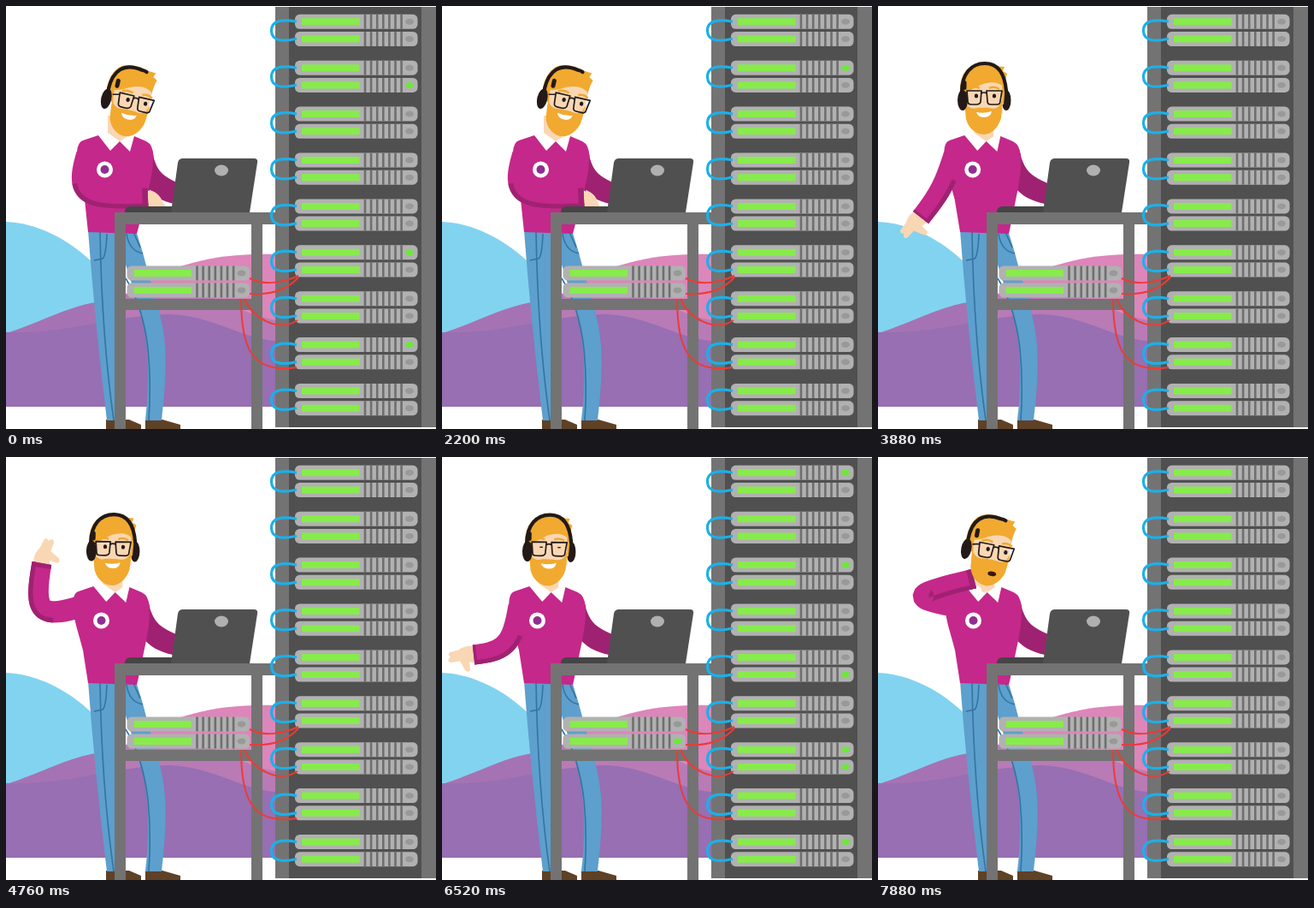
Write an HTML page that moves like this. It is 503x494 px and loops after 8 s.

```html
<!DOCTYPE html>
<html lang="en">
<head>
<meta charset="utf-8">
<title>Support desk</title>
<style>
html, body { margin: 0; width: 100%; height: 100%; overflow: hidden; background: #fff; }
svg { display: block; width: 100%; height: 100%; }
</style>
</head>
<body>
<svg viewBox="0 0 503 494">
  <g id="hills">
    <path fill="#82d3f0" d="M0 252C34 253 73 271 105 303L135 330V350L0 382Z"/>
    <path fill="#dc86ba" d="M150 326C200 302 245 288 315 290V390H150Z"/>
    <path fill="#a573b4" d="M0 382C40 370 75 349 112 345L135 340V390H0Z"/>
    <path fill="#b87bb6" d="M135 338C170 324 205 326 240 340C270 352 290 362 315 367V395H135Z"/>
    <path fill="#976fb2" d="M0 381C70 384 120 362 190 360C240 361 275 388 315 391V468H0Z"/>
  </g>

  <g id="legs">
    <path fill="#5f4126" d="M117 483H144L158 489V494H117ZM163 483H183L204 489V494H163Z"/>
    <path fill="#5d9fcd" d="M96 262H152L160 288C168 320 178 348 183 374C189 405 187 440 182 484H163C168 440 168 400 157 356L140 302L134 484H118Q104 370 96 262Z"/>
    <g fill="none" stroke="#33759f" stroke-width="1.6">
      <path d="M110 264Q112 385 126 484M140 318Q160 350 166 400Q170 440 167 484"/>
      <path d="M118 266Q117 292 113 295L103 297M141 266Q144 286 160 289M149 264L157 282"/>
    </g>
  </g>

  <g id="torso">
    <path fill="#9f2272" d="M166 162Q172 166 173 178C178 194 184 199 204 208L197 231C182 228 170 222 160 208Z"/>
    <path fill="#f9d7b4" d="M119 128H142V152L133 160L119 152Z"/>
    <path fill="#fff" d="M108 151L119 148L133 158L146 150L150 152L145 171H122Z"/>
    <path fill="#c4288a" d="M83 170Q84 159 90 157L108 151L122 169L133 158L145 170L150 152L164 158Q172 162 172 174C173 195 166 215 160 240L153 266L96 264L92 226C88 205 82 190 83 170Z"/>
  </g>
  <path id="hand" fill="#f9d7b4" d="M-3 -9C6 -11 12 -9 18 -4L28 0Q31 3 27 5L29 9Q28 13 23 11L15 9L8 19Q4 22 2 18L4 9H-3Z"/>
  <path id="sleeve" fill="#c4288a"/>
  <path id="shade" fill="#9f2272"/>
  <path id="cuff" fill="#9f2272"/>
  <g id="badge"><circle r="9.5" fill="#fff"/><circle r="5" fill="#8f2f8f"/></g>

  <g id="head">
    <ellipse id="farCup" rx="5.5" ry="12" cy="3" fill="#231a17"/>
    <path fill="#f1a92f" d="M-26 8C-30 -18 -24 -37 -6 -38C4 -41 12 -36 25 -36L23 -31L28 -28C25 -20 26 -8 24 8Z"/>
    <path id="skin" fill="#f9d7b4" d="M-21 -7C-10 -9 -4 -16 4 -17C12 -19 18 -17 22 -14L23 18L8 36H-8L-19 22Z"/>
    <g id="beard">
      <path fill="#f1a92f" d="M-23 -4L-20 8C-12 16 -10 11 0 12C10 11 14 16 20 8L23 0L21 24C17 37 8 43 1 43C-7 43 -17 37 -20 25Z"/>
      <path id="smile" fill="#fff" d="M-8 17Q1 19 10 16Q9 23 1 23Q-6 23 -8 17Z"/>
      <ellipse id="gasp" cx="6" cy="28" rx="5" ry="2.8" fill="#3a1714"/>
    </g>
    <g id="face">
      <path fill="none" stroke="#f1a92f" stroke-width="2.5" d="M-17 -10Q-11 -14 -4 -11M7 -11Q13 -14 19 -10"/>
      <g id="eyes" fill="#231a17"><ellipse cx="-8" rx="2.2" ry="2.5"/><ellipse cx="13" rx="2.2" ry="2.5"/></g>
      <path fill="none" stroke="#231a17" stroke-width="1.7" stroke-linejoin="round" d="M-19 -8H-2L-3 5Q-4 8 -8 8H-14Q-18 8 -18 4ZM4 -8H22L20 4Q20 8 16 8H9Q5 8 5 4ZM-2 -5Q1 -7 4 -5M-19 -6L-27 -4"/>
    </g>
    <path id="band" fill="none" stroke="#231a17" stroke-width="4.2" stroke-linecap="round"/>
    <rect id="tab" x="-2.5" y="-5" width="5" height="11" rx="2.5" fill="#231a17"/>
    <ellipse id="nearCup" rx="6" ry="12" fill="#231a17"/>
  </g>

  <g id="desk">
    <path fill="#737373" d="M127 241H315V255H300V494H287V355H140V494H127ZM140 255V342H287V255Z"/>
    <path fill="#454545" d="M139 241Q139 234 146 234H200V241Z"/>
    <path fill="#505050" d="M207 178H290Q295 178 294 183L285 241H193L201 183Q202 178 207 178Z"/>
    <ellipse cx="252" cy="192" rx="8" ry="6.5" fill="#b0b0b0"/>
  </g>
  <g id="rack">
    <path fill="#737373" d="M315 1H503V492H315Z"/>
    <path fill="#505050" d="M331 1H486V492H331Z"/>
  </g>
  <g id="units"></g>
  <g id="loops" fill="none" stroke="#1cb0e8" stroke-width="3.2"></g>
  <g fill="none" stroke="#ee3a35" stroke-width="2">
    <path d="M285 318C302 327 325 323 342 315M285 336C312 338 330 330 342 317"/>
    <path d="M279 342C288 364 318 382 341 367M275 342C275 400 288 430 340 422"/>
  </g>
</svg>
<script>
const LOOP = 8000;
const $ = id => document.getElementById(id);
const set = (id, name, value) => $(id).setAttribute(name, value);
const mix = (a, b, k) => a + (b - a) * k;
const ease = k => (1 - Math.cos(Math.PI * k)) / 2;

// Server units and their lamps
const lamps = [];
function addUnit(x, y, blink) {
  let stripes = '';
  for (let i = 0; i < 7; i++) stripes += `M${x + 82 + i * 7.1} ${y - 8.5}v17`;
  $('units').insertAdjacentHTML('beforeend', `
    <rect x="${x}" y="${y - 8.5}" width="143.5" height="17" rx="5.5" fill="#b1b1b1"/>
    <rect x="${x + 8}" y="${y - 4}" width="67.5" height="8" rx="1" fill="#87eb4b"/>
    <path d="${stripes}" stroke="#6f6f6f" stroke-width="2.6"/>
    <ellipse cx="${x + 134}" cy="${y}" rx="5" ry="3.5"/>`);
  lamps.push({ el: $('units').lastElementChild, blink });
}

// [period, start, length] of each lamp rhythm
const rhythms = {
  a: [840, 760, 160], b: [900, 340, 100], c: [840, 600, 120], d: [1270, 100, 60],
  e: [1100, 700, 110], f: [1100, 820, 100], g: [1100, 420, 110]
};
[...'cebacfegfcafecagcd'].forEach((key, i) => {
  const row = i >> 1, y = 18.3 + row * 53.9;
  // the second row swaps its two lamps
  const blink = rhythms[i === 2 ? 'b' : i === 3 ? 'a' : key === 'a' && i === 10 ? 'a' : key];
  addUnit(338, y + (i % 2) * 20.2, i === 9 ? rhythms.c : i === 10 ? rhythms.a
    : i === 12 ? rhythms.c : i === 14 ? rhythms.a : i === 16 ? rhythms.c : blink);
  if (i % 2 === 0) $('loops').insertAdjacentHTML('beforeend',
    `<path d="M340 ${y}C324 ${y - 3} 310 ${y - 2} 310.500 ${y + 11}C311 ${y + 24} 326 ${y + 23} 340 ${y + 20}"/>`);
});
addUnit(141.5, 312, rhythms.e);
addUnit(141.5, 332, rhythms.c);

// wrist x y, elbow x y, hand angle, hand flip, lean, head x y, tilt, turn
const poses = {
  type: [166, 224, 78, 228, 30, 1, 0, 143, 108, 13, 1],
  sway: [167, 225, 82, 228, 25, 1, 3.5, 149.5, 108.5, 15, 1],
  hang: [74, 250, 82, 216, 112, -1, -4, 124, 107, 1, 0],
  down: [50, 247, 76, 214, 148, -1, -6, 123, 107, 0, 0],
  out: [35, 205, 60, 216, 200, -0.5, -5, 124, 107, 1, 0],
  wave: [42, 124, 30, 192, 276, 1, -5, 124, 107, 1, 0],
  low: [37, 231, 81, 226, 186, -1, -5, 124, 107.5, 1, 0],
  lift: [30, 192, 50, 215, 222, 0.4, -5, 125, 107, 3, 0.2],
  think: [112, 142, 26, 163, 335, 1, -5, 129, 106, 11, 1]
};
const keys = [
  [0, 'type'], [500, 'type'], [1150, 'sway'], [1500, 'sway'], [2100, 'type'], [2640, 'type'],
  [3440, 'hang'], [3640, 'hang'], [3880, 'down'], [4180, 'out'], [4500, 'wave'], [5760, 'wave'],
  [6150, 'out'], [6480, 'low'], [6640, 'low'], [6940, 'lift'], [7420, 'think'], [LOOP, 'think']
];

function poseAt(t) {
  let i = 0;
  while (i < keys.length - 2 && t >= keys[i + 1][0]) i++;
  const [t0, a] = keys[i], [t1, b] = keys[i + 1];
  const k = ease((t - t0) / (t1 - t0));
  return poses[a].map((v, j) => mix(v, poses[b][j], k));
}

// Ribbon along the arm curve, between two sides (-1..1) and two positions (0..1)
function ribbon([sx, sy], [ex, ey], [wx, wy], side0, side1, from = 0, to = 1) {
  const cx1 = mix(sx, ex, 0.85), cy1 = mix(sy, ey, 0.85);
  const cx2 = mix(wx, ex, 0.85), cy2 = mix(wy, ey, 0.85);
  const left = [], right = [];
  for (let i = 0; i <= 24; i++) {
    const k = mix(from, to, i / 24), q = 1 - k;
    const at = (a, b, c, d) => q * q * q * a + 3 * q * q * k * b + 3 * q * k * k * c + k * k * k * d;
    const slope = (a, b, c, d) => q * q * (b - a) + 2 * q * k * (c - b) + k * k * (d - c);
    const dx = slope(sx, cx1, cx2, wx), dy = slope(sy, cy1, cy2, wy);
    const r = mix(13, 11.5, k) / (Math.hypot(dx, dy) || 1);
    const x = at(sx, cx1, cx2, wx), y = at(sy, cy1, cy2, wy);
    const point = s => `${(x - dy * r * s).toFixed(2)} ${(y + dx * r * s).toFixed(2)}`;
    left.push(point(side0));
    right.unshift(point(side1));
  }
  return 'M' + left.concat(right).join('L') + 'Z';
}

function drawHead(x, y, tilt, u, t) {
  const shift = (id, dx, dy) => set(id, 'transform', `translate(${dx} ${dy})`);
  set('head', 'transform', `translate(${x} ${y}) rotate(${tilt})`);
  shift('skin', 3 * u, u);
  shift('beard', 4 * u, u);
  shift('face', 8 * u, 3.5 * u);
  shift('tab', -22 + 6 * u, -15);
  set('farCup', 'cx', 27 - 14 * u);
  set('nearCup', 'cx', -24 - u);
  set('nearCup', 'cy', 3 + 3 * u);
  set('band', 'd', `M-25 -6C-25 -28 -14 -40 ${2 + 6 * u} ${-40 + 4 * u}` +
    `C${mix(16, 11, u)} ${mix(-40, -36, u)} ${mix(25, 12, u)} ${mix(-30, -36, u)} ${mix(27, 14, u)} ${mix(-8, -35, u)}`);
  const worried = t > 7150;
  set('gasp', 'opacity', worried ? 1 : 0);
  set('smile', 'opacity', worried ? 0 : 1);
  const blinking = t > 6440 && t < 6600;
  set('eyes', 'transform', `translate(0 -2) scale(1 ${blinking ? 0.3 : 1})`);
}

function draw(t) {
  let [wx, wy, ex, ey, angle, flip, lean, hx, hy, tilt, turn] = poseAt(t);
  if (t < 2520) {
    angle += 7 * Math.sin(t / 55);
    wy += Math.sin(t / 70);
  }
  if (t > 4500 && t < 5540) {
    const swing = Math.sin((t - 4500) / 520 * 2 * Math.PI);
    wx += 7 * swing;
    angle += 12 * swing;
  }
  if (t > 7420) wx += 1.5 * Math.sin((t - 7420) / 50);

  set('torso', 'transform', `matrix(1 0 ${-lean / 100} 1 ${lean * 2.64} 0)`);
  set('badge', 'transform', `translate(${115.5 + lean * 0.8} 191)`);
  const arm = [[95 + lean * 0.9, 174], [ex, ey], [wx, wy]];
  const side = turn > 0.5 ? 1 : -1;
  const depth = 0.45 * Math.abs(2 * turn - 1);
  set('sleeve', 'd', ribbon(...arm, -1, 1));
  set('shade', 'd', ribbon(...arm, side, side * (1 - depth), 0.3));
  set('cuff', 'd', ribbon(...arm, -1, 1, 0.97));
  set('hand', 'transform', `translate(${wx} ${wy}) rotate(${angle}) scale(1 ${flip})`);
  drawHead(hx, hy, tilt, turn, t);

  for (const { el, blink: [period, start, length] } of lamps) {
    const on = (t - start + period) % period < length;
    el.setAttribute('fill', on ? '#6ee63c' : '#999');
  }
}

const begin = performance.now();
function tick() {
  draw((performance.now() - begin) % LOOP);
  requestAnimationFrame(tick);
}
draw(0);
requestAnimationFrame(tick);
</script>
</body>
</html>
```
